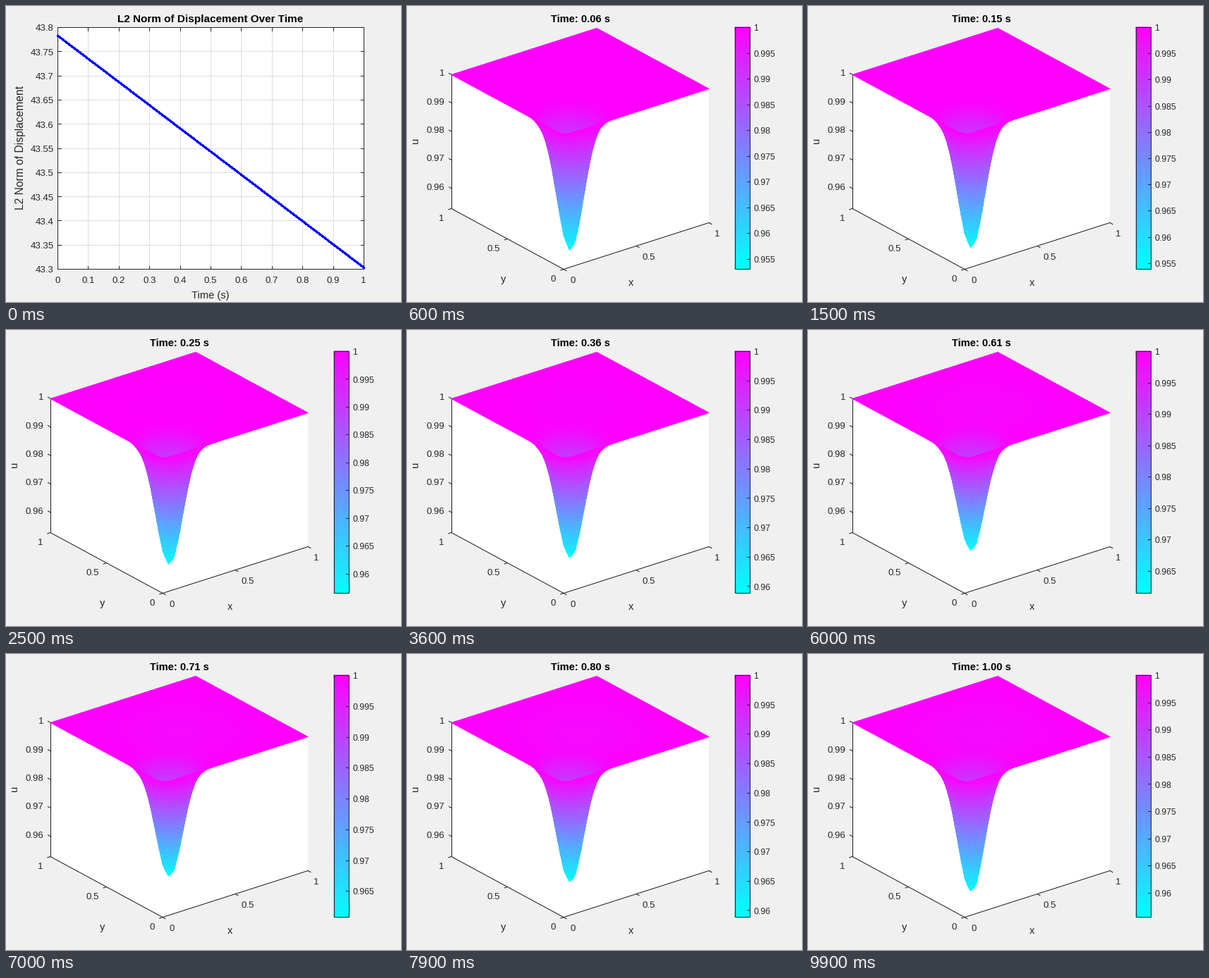
Write a matplotlib script that moves like this. It is 560 by 420 pixels and loops after 10000 ms.

```python
import matplotlib.pyplot as plt
import numpy as np
from matplotlib.animation import FuncAnimation

W, H, FRAMES = 560, 420, 100
PX = 0.72  # points per pixel at 100 dpi
INK = "#262626"
plt.rcParams["font.family"] = "Liberation Sans"

fig = plt.figure(figsize=(W / 100, H / 100), dpi=100, facecolor="#f0f0f0")
ax = fig.add_axes([0, 0, 1, 1])

# Screen projection of the unit box
FRONT = np.array([222.0, 183.5])
EX = np.array([206.0, -66.0])
EY = np.array([-159.0, -86.0])
FLOOR = np.array([0.0, 190.0])
Z_SCALE = 4040
X_TICK = -4.5 * EY / np.hypot(*EY)
Y_TICK = -4.5 * EX / np.hypot(*EX)

# Mesh ordered back to front, so that near cells cover far ones
side = np.linspace(1, 0, 46)
X, Y = np.meshgrid(side, side)
R2 = (X - 0.183) ** 2 + (Y - 0.178) ** 2
DIP = np.exp(-R2 / (2 * 0.0725 ** 2)) * (X > 0) * (Y > 0)
DIP /= DIP.max()
SAG = np.sin(np.pi * X) * np.sin(np.pi * Y)

# Depth of the dip over time (frame index, depth * 1e4)
KEYS = [(0, 466), (7, 470), (15, 461), (18, 454), (19, 449.5), (33, 415),
        (36, 411.4), (44, 400.5), (49, 386.8), (58, 385), (66, 386.5),
        (70, 391.8), (75, 400.7), (77, 407), (79, 411.4), (88, 444.5),
        (94, 447.5), (99, 444.2)]
KEY_N, KEY_D = np.transpose(KEYS)


def line(p, q, color=INK, width=1, **kw):
    ax.plot([p[0], q[0]], [p[1], q[1]], color=color, lw=width * PX, **kw)


def label(x, y, s, size=13.3, ha="center", color=INK, **kw):
    ax.text(x, y + 0.35 * size, s, fontsize=size * PX, ha=ha,
            va="baseline", color=color, **kw)


def vertical(x, y, s, size):
    ax.text(x, y, s, fontsize=size * PX, ha="center", va="center",
            rotation=90, color=INK)


def title(x, s, size):
    label(x, 17.5, s, size, color="black", weight="bold")


def frame_box(x0, y0, x1, y1):
    ax.plot([x0, x1, x1, x0, x0], [y0, y0, y1, y1, y0], color=INK, lw=PX,
            solid_joinstyle="miter")


def draw_norm():
    x0, y0, x1, y1 = 73, 30, 507, 373
    ax.fill([x0, x1, x1, x0], [y0, y0, y1, y1], "white", lw=0)
    for i in range(11):
        x = x0 + (x1 - x0) * i / 10
        y = y1 + (y0 - y1) * i / 10
        if 0 < i < 10:
            line((x, y0), (x, y1), alpha=0.15)
            line((x0, y), (x1, y), alpha=0.15)
        for end, step in ((y0, 4.5), (y1, -4.5)):
            line((x, end), (x, end + step))
        for end, step in ((x0, 4.5), (x1, -4.5)):
            line((end, y), (end + step, y))
        label(x, 388, f"{i / 10:g}")
        label(67.5, y + 0.8, f"{43.3 + i * 0.05:g}", ha="right")
    frame_box(x0, y0, x1, y1)
    line((x0 + 0.5, 42.3), (x1 + 0.5, 371.3), "blue", 2, aa=False)
    title(290, "L2 Norm of Displacement Over Time", 15.3)
    label(290, 409.5, "Time (s)", 14.6)
    vertical(20.5, 201, "L2 Norm of Displacement", 15.6)


def axis_line(p, q):
    line(p, q, color="#1a1a1a", snap=False)


def draw_box():
    left, right, back = FRONT + EY, FRONT + EX, FRONT + EX + EY
    wall = [left, back, right, right + FLOOR, FRONT + FLOOR, left + FLOOR]
    ax.fill(*np.transpose(wall), "white", lw=0)
    base = FRONT + FLOOR
    axis_line(left + (0.5, 0), left + FLOOR + (0.5, 0))
    for edge, tick in ((EX, X_TICK), (EY, Y_TICK)):
        axis_line(base, base + edge)
        for v in (0, 0.5, 1):
            axis_line(base + v * edge, base + v * edge + tick)
    for v in (0, 0.5, 1):
        mid = 5 * (v == 0.5)
        label(235 + 205 * v + mid, 388 - 66 * v, f"{v:g}")
        label(207 - 158 * v - mid, 386.5 - 86 * v, f"{v:g}")
    for i in range(5):
        p = left + (0.5, i * 0.01 * Z_SCALE)
        axis_line(p, p + EY * 0.025)
        label(53.5, p[1] - 3, f"{1 - i / 100:g}", ha="right")
    label(318, 392, "x", 14.6)
    label(137, 387, "y", 14.6)
    vertical(12, 191, "u", 14.6)


def draw_surface(depth, t, rng):
    drop = np.minimum(depth * DIP + 0.0018 * t * SAG, depth)
    sx = FRONT[0] + EX[0] * X + EY[0] * Y
    sy = FRONT[1] + EX[1] * X + EY[1] * Y + Z_SCALE * drop
    ax.pcolormesh(sx, sy, 1 - drop / depth, cmap="cool", vmin=0, vmax=1,
                  shading="gouraud", zorder=3)
    # tiny gaps between cells on the near wall
    k = np.array([0, 0.45, 0.7, 1])
    ax.scatter(253 - 10 * k + rng.integers(-1, 2, 4), 220 + 25 * k,
               s=0.35, c="white", marker="s", lw=0, zorder=4)


def draw_colorbar(depth):
    x0, y0, x1, y1 = 465, 30, 486, 373
    ax.pcolormesh([x0, x1], [y0, y1], [[1, 1], [0, 0]], cmap="cool",
                  shading="gouraud")
    frame_box(x0, y0, x1, y1)
    for i in range(int(depth / 0.005) + 1):
        y = y0 + (y1 - y0) * i * 0.005 / depth
        line((x1 - 4, y), (x1, y))
        label(491, y + 0.8, f"{1 - i * 0.005:g}", 12.2, ha="left")


def draw(n):
    ax.clear()
    ax.axis("off")
    ax.set_xlim(0, W)
    ax.set_ylim(H, 0)
    if n == 0:
        draw_norm()
        return
    t = n / (FRAMES - 1)
    depth = np.interp(n, KEY_N, KEY_D) * 1e-4
    draw_box()
    draw_surface(depth, t, np.random.default_rng(n))
    draw_colorbar(depth)
    title(245.5, f"Time: {t:.2f} s", 14.6)


anim = FuncAnimation(fig, draw, frames=FRAMES, interval=100,
                     init_func=lambda: None, repeat=True, repeat_delay=0)
plt.show()
```
